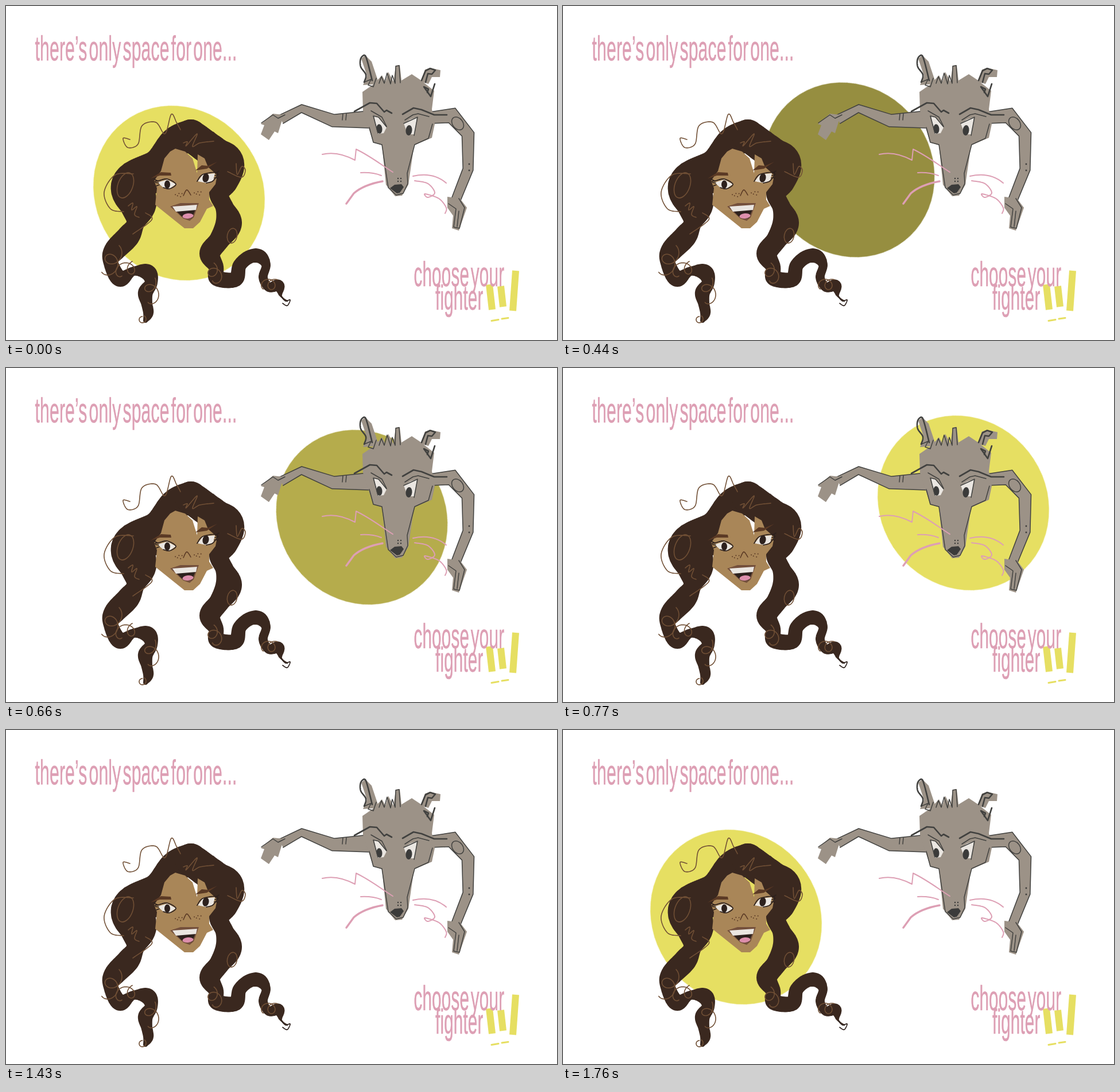
An HTML page that plays this animation: 960 px wide and 583 px high, repeating every 1.98 s.

```html
<!DOCTYPE html>
<html lang="en">
<head>
<meta charset="utf-8">
<title>Choose your fighter</title>
<style>
  html, body { margin: 0; width: 100%; height: 100%; overflow: hidden; background: #fff; }
  svg { display: block; width: 100%; height: 100%; }
  path { fill: none; stroke-linecap: round; stroke-linejoin: round; }
  text {
    font-family: "Liberation Sans", Arial, sans-serif;
    word-spacing: -11.5px; letter-spacing: .4px;
    fill: #dd9fb4; stroke: #dd9fb4; stroke-width: .6;
  }
  .hair { fill: #3a281f; }
  .skin { fill: #a98658; }
  .curl { stroke: #704f35; stroke-width: 1.6; }
  .feature { stroke: #5b3a25; stroke-width: 1.6; }
  .brow { fill: #5b3a25; }
  .white { fill: #eae6e1; }
  .dark { fill: #2d211d; }
  .lid { stroke: #2d211d; stroke-width: 1.7; }
  .lip { fill: #74503c; }
  .tongue { fill: #dd8fac; }
  .fur { fill: #9c9287; }
  .ink { stroke: #41413f; stroke-width: 1.5; }
  .bold { stroke: #41413f; stroke-width: 2.6; }
  .black { fill: #3b3b3a; }
  .whisker { stroke: #dd9fb4; stroke-width: 2; }
  .thick { stroke: #dd9fb4; stroke-width: 3.4; }
  .bar { stroke: #e6df62; stroke-width: 12; stroke-linecap: butt; }
  .dash { stroke: #e6df62; stroke-width: 3; }

  #spot { animation: hop 1980ms step-end infinite; }
  @keyframes hop {
    0%, 88.888%      { transform: translate(301.5px, 326.5px); fill: #e6df62; visibility: visible; }
    16.666%, 83.333% { transform: translate(375.5px, 312.5px); fill: #b5ac4c; visibility: visible; }
    22.222%, 77.777% { transform: translate(498px, 286px); fill: #968e40; visibility: visible; }
    27.777%, 72.222% { transform: translate(498px, 286px); fill: #968e40; visibility: hidden; }
    33.333%, 66.666% { transform: translate(620px, 260.5px); fill: #b5ac4c; visibility: visible; }
    38.888%          { transform: translate(697.5px, 235.5px); fill: #e6df62; visibility: visible; }
    100%             { transform: translate(301.5px, 326.5px); fill: #e6df62; visibility: visible; }
  }
</style>
</head>
<body>
<svg viewBox="0 0 960 583" preserveAspectRatio="none">
  <g id="spot"><ellipse rx="157.3" ry="144.4" transform="rotate(52)"/></g>
  <g id="art"></g>
  <text transform="translate(50.5 95) scale(.485 1)" font-size="62">there’s only space for one...</text>
  <text transform="translate(710.5 489) scale(.485 1)" font-size="61">choose your</text>
  <text transform="translate(748 530) scale(.485 1)" font-size="61">fighter</text>
</svg>
<script>
const art = document.getElementById('art');

function add(style, d) {
  const path = document.createElementNS('http://www.w3.org/2000/svg', 'path');
  path.setAttribute('class', style);
  path.setAttribute('d', d);
  art.append(path);
}

// Splits "x y x y ..." (or "x y width ..." with size 3) into points.
function points(text, size = 2) {
  const n = text.split(' ').map(Number);
  return Array.from({ length: n.length / size }, (_, i) => n.slice(i * size, i * size + size));
}

// Samples a Catmull-Rom spline in any number of dimensions.
function spline(keys, steps = 16) {
  const key = i => keys[Math.max(0, Math.min(keys.length - 1, i))];
  const result = [];
  for (let i = 0; i < keys.length - 1; i++) {
    const [a, b, c, d] = [-1, 0, 1, 2].map(k => key(i + k));
    for (let s = 0; s < steps; s++) {
      const t = s / steps;
      result.push(b.map((v, k) => v + t / 2 * (c[k] - a[k]
        + t * (2 * a[k] - 5 * v + 4 * c[k] - d[k] + t * (3 * (v - c[k]) + d[k] - a[k])))));
    }
  }
  return [...result, key(keys.length)];
}

const disc = ([x, y, r]) => `M${x - r} ${y}a${r} ${r} 0 1 0 ${2 * r} 0a${r} ${r} 0 1 0 ${-2 * r} 0Z`;
const trace = list => 'M' + list.join('L');
const zig = (style, text) => add(style, trace(points(text)));
const poly = (style, text) => add(style, trace(points(text)) + 'Z');
const line = (style, text) => add(style, trace(spline(points(text))));
const dot = (style, x, y, r) => add(style, disc([x, y, r]));

function oval(style, x, y, rx, ry, tilt = 0) {
  const dx = rx * Math.cos(tilt), dy = rx * Math.sin(tilt);
  const arc = `a${rx} ${ry} ${tilt * 180 / Math.PI} 1 0 `;
  add(style, `M${x - dx} ${y - dy}${arc}${2 * dx} ${2 * dy}${arc}${-2 * dx} ${-2 * dy}Z`);
}

// A lock of hair: a round brush of changing radius drawn along a spine.
const lock = text => add('hair', spline(points(text, 3)).map(disc).join(''));

// A loose curl: a circle of radius r that drifts from one point to another.
function coil(x, y, toX, toY, r, turns, start = 0) {
  const path = Array.from({ length: 61 }, (_, i) => {
    const t = i / 60, a = start + t * turns * 2 * Math.PI;
    return [x + (toX - x) * t + r * Math.cos(a), y + (toY - y) * t + r * Math.sin(a)];
  });
  add('curl', trace(path));
}

// A bony limb: straight edges at half-width w either side of a bent spine.
function limb(text) {
  const spine = points(text, 3);
  const edge = side => spine.map(([x, y, w], i) => {
    const [ax, ay] = spine[i - 1] || spine[i], [bx, by] = spine[i + 1] || spine[i];
    const length = Math.hypot(bx - ax, by - ay);
    return [x - side * w * (by - ay) / length, y + side * w * (bx - ax) / length];
  });
  const [left, right] = [edge(1), edge(-1)];
  add('fur', trace([...left, ...right.reverse()]) + 'Z');
  add('ink', trace(left) + trace(right));
}

function outlined(text) {
  poly('fur', text);
  poly('ink', text);
}

function freckles(x, y) {
  for (let i = 1; i < 6; i++) dot('brow', x + 3 * Math.sqrt(i) * Math.cos(i * 2.4), y + 2 * Math.sqrt(i) * Math.sin(i * 2.4), 1);
}

function drawWoman() {
  lock('322 226 28 295 239 28 268 280 32 222 312 38 230 345 32 226 378 16 213 402 20 190 426 19 182 445 13 198 476 14 222 463 8 247 465 14 253 483 11 243 500 13 245 518 10 248 536 9 243 549 4');
  lock('322 226 28 365 258 29 383 275 32 382 305 23 371 328 17 381 352 16 388 380 23 372 408 18 355 432 18 366 455 13 368 475 14 400 477 13 407 453 12 424 438 12 442 437 12 453 452 8 448 474 8 458 491 8 475 488 10 479 506 2 490 515 1.2');

  poly('skin', '276 266 286 254 295 249 312 254 325 266 333 292 334 259 346 266 352 281 368 295 365 311 354 325 354 338 361 349 350 354 338 377 326 388 311 388 260 347 263 318 258 305 270 288');
  poly('brow', '252 301 270 290 287 291 288 296 268 296');
  poly('brow', '330 287 341 278 352 279 368 272 350 284');

  poly('white', '264 308 281 303 296 311 285 319 274 317');
  poly('white', '334 306 343 294 364 292 361 305 349 309');
  oval('dark', 281, 311.5, 5, 7.2);
  oval('dark', 348, 300, 5.5, 7.8, .2);
  line('lid', '259 306 266 305 281 302 296 311 285 319 274 317');
  line('lid', '333 306 343 294 368 291 361 305 349 309');
  for (let i = 0; i < 3; i++) {
    zig('lid', `${265 + i} ${306 + 3 * i} ${258 + 2 * i} ${302 + 6 * i}`);
    zig('lid', `${365 - i} ${292 + 4 * i} ${371 - i} ${288 + 6 * i}`);
  }
  line('feature', '309 331 315 321 322 330');
  freckles(301, 330);
  freckles(334, 327);

  poly('lip', '286 350 304 344 336 344 327 369 320 375 309 371');
  poly('dark', '291 352 333 348 324 370 317 371 306 367');
  poly('white', '290 350 333 347 331 356 296 359');
  oval('tongue', 317, 366.5, 9.5, 4.5, -.1);

  line('curl', '216 233 204 231 212 247 230 241 237 209 261 203 277 223 288 189 297 203 304 216');
  line('curl', '222 293 190 295 171 325 182 354 205 359');
  line('curl', '213 349 221 344 219 356 228 350 224 364 232 369');
  line('curl', '243 361 254 373 221 398');
  line('curl', '401 275 403 294 411 280 417 287 410 299 386 289');
  line('curl', '309 239 316 237 314 244 333 223 325 245 338 239 362 236');
  oval('curl', 208, 313, 13, 23, .35);
  oval('curl', 394, 401, 8.5, 13, .2);
  coil(190, 429, 179, 460, 13, 1.6, -1);
  coil(196, 462, 226, 455, 11, 1.5, 1);
  coil(250, 480, 257, 512, 11, 1.5, -.5);
  coil(238, 546, 238, 548, 6, .9, -1);
  coil(357, 457, 369, 476, 10, 1.6, -1);
  coil(452, 486, 469, 486, 9, 1.5, 2);
  line('lid', '480 508 487 515 495 513 490 523 482 519');
}

function drawWolf() {
  limb('632 198 15 570 200 11 515 179 7 479 198 8');
  limb('740 195 10 777 191 14 805 224 11 805 285 9 784 338 8');
  poly('fur', '444 206 465 188 484 190 474 222 468 219 458 234 444 224 450 208');
  zig('ink', '445 204 465 190 474 196 486 190');
  poly('fur', '769 352 769 333 791 336 803 352 789 392 777 388 779 366');
  zig('ink', '771 345 784 354 780 386 790 388 799 352 789 336');
  zig('ink', '789 358 786 385');
  poly('fur', '619 92 626 86 637 97 650 136 622 138 629 122');
  poly('fur', '722 132 730 111 739 108 757 112 756 124 742 124 736 136');
  poly('fur', '621 150 640 137 655 121 661 132 666 115 675 132 679 104 686 103 689 130 707 119 722 129 746 148 742 180 747 206 742 230 711 243 701 312 690 331 678 332 662 312 655 243 640 238 622 183');

  zig('ink', '633 212 640 238 655 242 666 317 680 330 692 327 700 310 699 292 712 242 736 231 743 206');
  oval('ink', 787, 205, 9, 12.5, -.66);
  for (const y of [276, 287]) dot('black', 807, y, 1.4);
  for (const x of [587, 593]) zig('ink', `${x} 188 ${x - 1} 199`);

  line('bold', '638 130 630 98 625 86 618 92 618 106 627 120 624 133');
  zig('ink', '624 133 636 128 631 138 640 141 645 126');
  zig('ink', '650 135 654 123 659 135 664 117 670 136 673 121 678 135 679 105 685 104 687 134');
  zig('bold', '724 130 731 113 739 109 748 112 742 119 735 118 731 133');
  zig('bold', '747 136 740 158 728 141 736 145 734 151');

  zig('bold', '607 184 634 169 646 170 659 185 663 182 672 187');
  zig('ink', '636 183 655 194 663 210');
  zig('bold', '691 189 710 178 724 181 746 190 768 190');
  zig('ink', '695 199 709 190 718 188 737 193');
  poly('white', '641 192 649 194 663 212 658 222 648 223');
  poly('white', '693 205 704 198 716 194 712 224 700 224');
  oval('black', 650.5, 214.5, 5, 8.2, -.1);
  oval('black', 702, 217, 5.5, 9, .1);
  zig('ink', '648 222 640 192 649 194 663 211');
  zig('ink', '693 205 717 194 711 226');
  poly('black', '669 318 677 312 689 311 693 316 686 326 681 327');
  for (const x of [683, 688]) for (const y of [301, 306]) dot('black', x, y, 1.2);

  add('whisker', 'M551 259C575 253 595 262 608 269L610 250C635 262 655 278 674 290');
  add('whisker', 'M618 291Q639 290 654 296');
  add('thick', 'M593 345L606 327Q623 312 656 306');
  add('whisker', 'M709 297Q744 289 767 309');
  line('whisker', '712 305 735 310 747 326 735 334 730 328 754 336 767 352 765 362');
}

function drawMarks() {
  zig('bar', '842 486 847 530');
  zig('bar', '862 489 866 525');
  zig('bar', '888 462 883 532');
  zig('dash', '846 549.5 858 547.5');
  zig('dash', '864 546 875 544.5');
}

drawWoman();
drawWolf();
drawMarks();
</script>
</body>
</html>
```
